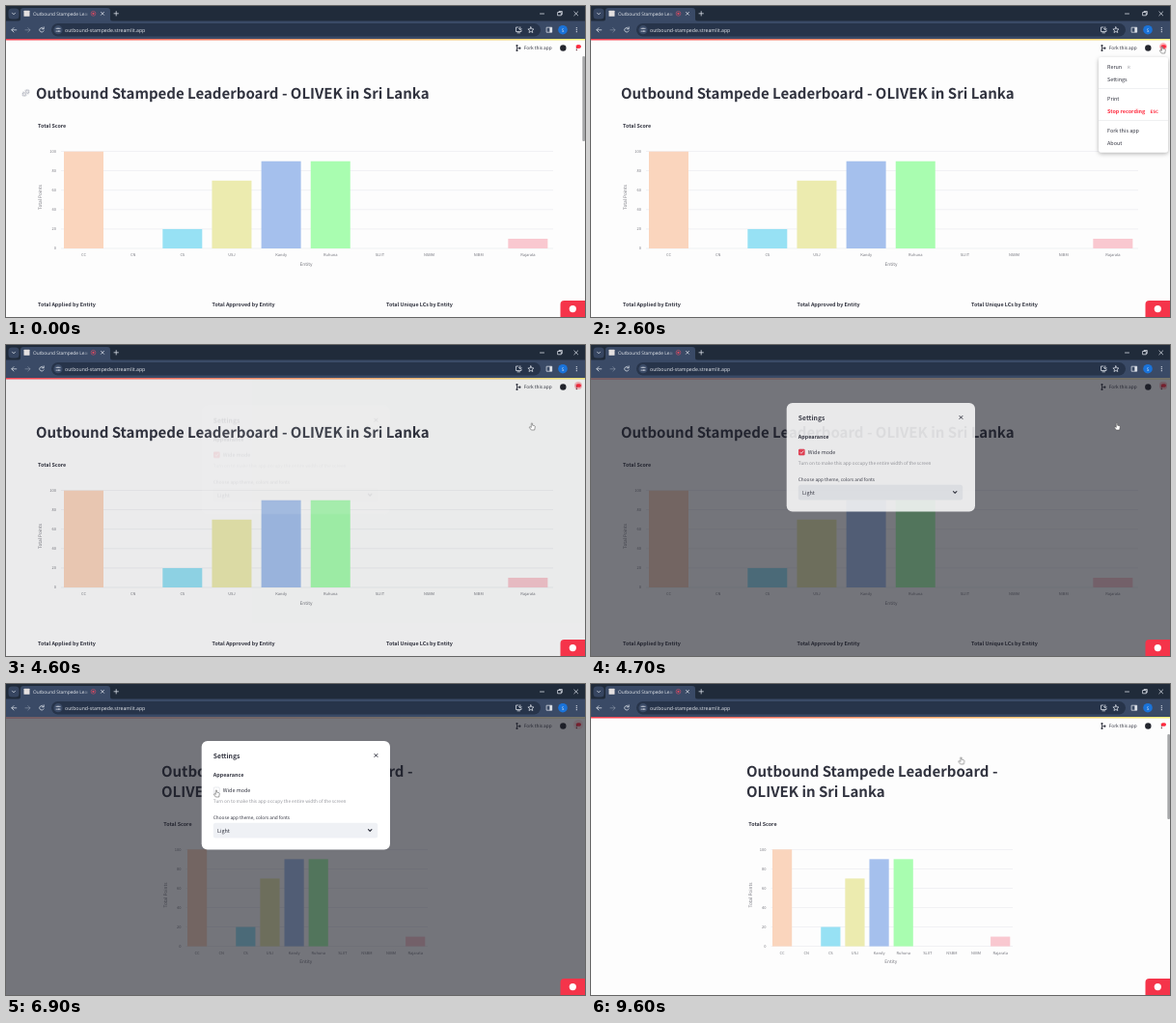
An HTML page that plays this animation: 600x322 px, repeating every 9700 ms.

```html
<!DOCTYPE html>
<html lang="en">
<head>
<meta charset="utf-8">
<title>Leaderboard</title>
<style>
html, body { margin: 0; width: 100%; height: 100%; overflow: hidden; background: #fff; }
svg { display: block; width: 600px; height: 322px; }
text {
  font-family: "Noto Sans CJK JP", "Noto Sans CJK SC", "Open Sans", sans-serif;
  fill: #31333f; white-space: pre; text-rendering: geometricPrecision;
}
.ui { font-family: "Open Sans", "Noto Sans", sans-serif; fill: #e6e9ee; }
.bold { font-weight: 700; }
.icon { fill: none; stroke: #d6dbe4; stroke-width: .8; stroke-linecap: round; stroke-linejoin: round; }
.loop { animation: 9.7s linear infinite; }

.anchor { animation-name: anchor; }
.bar { animation-name: bar; }
.menu { animation-name: menu; }
.hover { animation-name: hover; }
.pulse { animation-name: pulse; animation-duration: 1.94s; transform-origin: 593px 42px; }
.shade { animation-name: shade; }
.dialog { animation-name: dialog; }
.wide { animation-name: wide; }
.narrow { animation-name: narrow; }
.cursor { animation-name: move; }
.arrow { animation-name: arrow; }
.hand { animation-name: hand; }

@keyframes anchor { 0%, 9.27% { opacity: 1 } 9.28%, 100% { opacity: 0 } }
@keyframes bar { 0%, 22.67% { opacity: 1 } 22.68%, 91.74% { opacity: 0 } 91.75%, 100% { opacity: 1 } }
@keyframes menu { 0%, 22.67% { opacity: 0 } 22.68%, 47.41% { opacity: 1 } 47.42%, 100% { opacity: 0 } }
@keyframes hover { 0%, 44.32% { opacity: 0 } 44.33%, 100% { opacity: 1 } }
@keyframes pulse { 0% { opacity: .7; transform: scale(.4) } 70%, 100% { opacity: 0; transform: scale(1.2) } }
@keyframes shade { 0%, 47.3% { opacity: 0 } 48.3%, 89.69% { opacity: 1 } 91.75%, 100% { opacity: 0 } }
@keyframes dialog {
  0%, 47.3% { opacity: 0; transform: translateY(4px) }
  48.45% { opacity: .84; transform: translateY(1px) }
  49.5%, 89.69% { opacity: 1; transform: none }
  91.75%, 100% { opacity: 0; transform: translateY(4px) }
}
@keyframes wide { 0%, 67% { opacity: 1 } 67.01%, 100% { opacity: 0 } }
@keyframes narrow { 0%, 67% { opacity: 0 } 67.01%, 100% { opacity: 1 } }
@keyframes move {
  0%, 7.2% { transform: translate(500px, 80px); animation-timing-function: ease-in-out }
  19.6%, 30% { transform: translate(592px, 41px); animation-timing-function: ease-in-out }
  43%, 50.5% { transform: translate(545px, 80px); animation-timing-function: ease-in-out }
  58%, 60% { transform: translate(224.500px, 106px); animation-timing-function: ease-in-out }
  63%, 72% { transform: translate(218px, 109px); animation-timing-function: ease-in-out }
  84.5%, 100% { transform: translate(383.500px, 75px) }
}
@keyframes arrow {
  0%, 7.2% { opacity: 0 } 7.21%, 19.5% { opacity: 1 } 19.51%, 51.5% { opacity: 0 }
  51.51%, 61.5% { opacity: 1 } 61.51%, 73% { opacity: 0 } 73.01%, 83.5% { opacity: 1 } 83.51%, 100% { opacity: 0 }
}
@keyframes hand {
  0%, 19.5% { opacity: 0 } 19.51%, 51.5% { opacity: 1 } 51.51%, 61.5% { opacity: 0 }
  61.51%, 73% { opacity: 1 } 73.01%, 83.5% { opacity: 0 } 83.51%, 100% { opacity: 1 }
}
</style>
</head>
<body>
<svg id="stage" viewBox="0 0 600 322"></svg>
<script>
const GREY = '#808495', RED = '#ff2b3f', INK = '#31333f';
const FRAME = '#202b3a', TOOLBAR = '#3a4a66', FIELD = '#27344a';
const event = 'Outbound Stampede', club = 'OLIVEK in Sri Lanka';

const text = (x, y, size, str, attrs = '') => `<text x="${x}" y="${y}" font-size="${size}" ${attrs}>${str}</text>`;
const bold = (x, y, size, str, attrs = '') => text(x, y, size, str, 'class="bold" ' + attrs);
const rect = (x, y, w, h, fill, r = 0) => `<rect x="${x}" y="${y}" width="${w}" height="${h}" fill="${fill}" rx="${r}"/>`;
const icon = (d, attrs = '') => `<path class="icon" d="${d}" ${attrs}/>`;
const dot = (x, y, r, fill) => `<circle cx="${x}" cy="${y}" r="${r}" fill="${fill}"/>`;
const dots = (x, y, gap, r, fill) => [-gap, 0, gap].map(d => dot(x, y + d, r, fill)).join('');
const loop = (name, body) => `<g class="loop ${name}">${body}</g>`;

const scores = [
  ['CC', 100, '#fad5bd'], ['CN', 0], ['CS', 20, '#97e1f4'], ['USJ', 70, '#ecebaf'],
  ['Kandy', 90, '#a5c0ed'], ['Ruhuna', 90, '#a9fdb0'], ['SLIIT', 0], ['NSBM', 0],
  ['NIBM', 0], ['Rajarata', 10, '#f9c8d0']
];

function chart({ left, right, first, step, width, base, titleX }) {
  const mid = 'text-anchor="middle" fill-opacity=".65"';
  let out = '';
  for (let v = 0; v <= 100; v += 20) {
    const y = base - v * 1.003;
    out += rect(left, y - .25, right - left, .5, '#e4e5ea');
    out += text(left - 5, y + 1.4, 4, v, 'text-anchor="end" fill-opacity=".65"');
  }
  scores.forEach(([name, value, color], i) => {
    const x = first + i * step, h = value * 1.003;
    if (value) out += rect(x, base - h, width, h, color);
    out += text(x + width / 2, base + 8.2, 4, name, mid);
  });
  const midY = base - 53;
  out += text((left + right) / 2 - 1, base + 17.5, 4.75, 'Entity', mid);
  out += text(titleX, midY, 4.75, 'Total Points', `${mid} transform="rotate(-90 ${titleX} ${midY})"`);
  return out;
}

const windowBar = () => rect(0, 0, 600, 16, FRAME) + rect(0, 15.5, 600, 18.5, TOOLBAR)
  + `<path d="M12 16q3 0 3-3V5q0-3 3-3h87q3 0 3 3v8q0 3 3 3z" fill="${TOOLBAR}"/>`
  + rect(2.5, 2.5, 11, 11, '#364560', 3.5) + icon('M6.500 7.200l1.500 1.600 1.500-1.600')
  + rect(18.5, 4.8, 6, 6, '#e4e0e0', .5)
  + `<svg x="28" y="0" width="57" height="16"><text class="ui" x="0" y="9.800" font-size="4.800">${event} Leaderboard</text></svg>`
  + rect(80, 3, 6, 10, 'url(#tabFade)')
  + '<circle cx="90.500" cy="7.800" r="2.400" fill="none" stroke="#d0506a" stroke-width=".6"/>' + dot(90.5, 7.8, 1.1, '#e8485e')
  + icon('M98.500 6.300l3 3m0-3l-3 3M112 7.800h4.400m-2.200-2.200v4.400')
  + icon('M553.500 8h4M572 6.500h3.300v3.300H572zM573 6.500v-1h3.300v3.300h-1M588.800 6l3.800 3.800m0-3.800l-3.800 3.800', 'stroke-width=".6"')
  + icon('M10.800 24.800H6m2-2.200l-2.200 2.200L8 27')
  + icon('M20 24.800h4.800m-2-2.200l2.200 2.200-2.200 2.200', 'opacity=".4"')
  + icon('M39 23.500a2.300 2.300 0 1 0 .1 2.300M39.200 21.800v2h-2')
  + rect(47, 18, 507, 13.4, FIELD, 6.7) + dot(54, 24.7, 4.6, TOOLBAR)
  + icon('M52 23.300h1m2 0h1.200M52 26.100h1.800m1.800 0h.6') + dot(54, 23.3, .8, '#d6dbe4') + dot(54.8, 26.1, .8, '#d6dbe4')
  + text(61, 26.6, 5.2, event.toLowerCase().replace(' ', '-') + '.streamlit.app', 'class="ui"')
  + icon('M531 22h-2.500v4.500h5.500v-1.500M530 27.800h2.500M532.800 21.800v2.800m-1.300-1.200l1.300 1.300 1.300-1.300')
  + icon('M543.900 21.800l.9 2 2.100.2-1.600 1.400.5 2.100-1.900-1.100-1.900 1.100.5-2.100-1.600-1.400 2.100-.2z', 'stroke-width=".6"')
  + icon('M560.500 22.200h5.200v5h-5.200z') + rect(563.4, 22.2, 2.3, 5, '#e4e8ee')
  + dot(577, 24.7, 4.8, '#1a73d9') + text(577, 26.5, 4.8, 'S', 'class="ui" text-anchor="middle"')
  + dots(591.3, 24.7, 2, .65, '#d6dbe4');

const wide = () => bold(31, 96, 15, `${event} Leaderboard - ${club}`)
  + bold(33, 126, 5.4, 'Total Score')
  + chart({ left: 57, right: 567, first: 60, step: 51.15, width: 41, base: 251, titleX: 37 })
  + bold(33, 311, 5.4, 'Total Applied by Entity') + bold(213.5, 311, 5.4, 'Total Approved by Entity')
  + bold(394, 311, 5.4, 'Total Unique LCs by Entity');

const narrow = () => bold(161, 96, 15, `${event} Leaderboard -`) + bold(161, 116.5, 15, club)
  + bold(163.3, 146.7, 5.4, 'Total Score')
  + chart({ left: 186.5, right: 437, first: 188, step: 25.12, width: 20.2, base: 271.6, titleX: 167 });

const toolbar = () => icon('M529.500 41v5m0-2.300h2.600', `style="stroke:${INK}"`)
  + dot(529.5, 41, 1.1, INK) + dot(529.5, 46, 1.1, INK) + dot(532.4, 43.7, 1.1, INK)
  + text(536.8, 45.4, 4.75, 'Fork this app') + dot(577.3, 43.5, 3.2, '#24262e')
  + loop('pulse', dot(593, 42, 5, RED))
  + dots(591.3, 43.6, 1.9, .65, '#5d2730') + rect(590.8, 40.2, 5.2, 3.6, RED, 1.7);

const menu = () => '<rect x="526" y="53" width="72" height="98.500" rx="3" fill="#fff" filter="url(#shadow)"/>'
  + text(535, 65.3, 5.45, 'Rerun') + text(556, 65.2, 4.3, 'R', 'fill-opacity=".5"')
  + text(535, 78.4, 5.45, 'Settings')
  + loop('hover', rect(526, 70, 72, 13, '#f4f5f8') + text(535, 78.4, 5.45, 'Settings', 'fill-opacity=".14"'))
  + rect(526, 85.3, 72, .5, '#dfe0e5') + text(535, 98.1, 5.45, 'Print')
  + bold(535, 111.1, 5.45, 'Stop recording', `style="fill:${RED}"`) + bold(579.5, 110.9, 4.5, 'ESC', `style="fill:${RED}"`)
  + rect(526, 118, 72, .5, '#dfe0e5') + text(535, 130.7, 5.45, 'Fork this app') + text(535, 143.8, 5.45, 'About');

const dialog = () => rect(202.7, 59, 195.3, 112.6, '#fff', 6)
  + bold(214.8, 76.8, 6.8, 'Settings') + icon('M381.900 72.400l3.100 3.100m0-3.100l-3.100 3.100', `style="stroke:${INK};stroke-width:1"`)
  + bold(214.8, 96, 5.45, 'Appearance')
  + '<rect x="215.300" y="107" width="6" height="6" rx="1" fill="#fff" stroke="#d3d5dc" stroke-width=".5"/>'
  + loop('wide', rect(215, 106.7, 6.6, 6.6, '#f5364c', 1.2) + icon('M216.700 110.100l1.200 1.200 2.100-2.500', 'style="stroke:#fff"'))
  + text(224.8, 112, 5.45, 'Wide mode')
  + text(214.8, 123.2, 4.76, 'Turn on to make this app occupy the entire width of the screen', 'fill-opacity=".5"')
  + text(214.8, 139.6, 4.76, 'Choose app theme, colors and fonts')
  + rect(214.8, 143.8, 170.4, 15.6, '#eff1f5', 2.5) + text(219, 153.6, 5.45, 'Light')
  + icon('M375.500 150.700l1.700 1.700 1.700-1.700', `style="stroke:${INK};stroke-width:1.200"`);

const cursor = () => loop('arrow', '<path d="M0 0v6.200l1.500-1.300 1 2.200.9-.4-1-2.200h2z" fill="#fff" stroke="#333" stroke-width=".4"/>')
  + loop('hand', '<path d="M-.7 1.200q.7-1.100 1.300 0v2l2.100.5q.7.300.6 1L2.700 8h-3.400L-2.600 5.500q-.2-.9.700-.8l1.200.7z" fill="#fff" stroke="#444" stroke-width=".5"/>');

document.getElementById('stage').innerHTML = `
  <defs>
    <linearGradient id="strip"><stop stop-color="#ff4052"/><stop offset="1" stop-color="#fbf07a"/></linearGradient>
    <linearGradient id="tabFade"><stop stop-color="${TOOLBAR}" stop-opacity="0"/><stop offset="1" stop-color="${TOOLBAR}"/></linearGradient>
    <filter id="shadow" x="-20%" y="-20%" width="140%" height="140%">
      <feDropShadow dx="0" dy="1.500" stdDeviation="2" flood-opacity=".3"/>
    </filter>
  </defs>`
  + rect(0, 33, 600, 289, '#fdfdfd') + rect(0, 33.7, 600, 1.8, 'url(#strip)')
  + loop('anchor', `<g transform="rotate(-40 20.500 90)" fill="none" stroke="${GREY}" stroke-width=".7">
      <path d="M20 88.200h-1.500a1.800 1.800 0 0 0 0 3.600H20M21 88.200h1.500a1.800 1.800 0 0 1 0 3.600H21M18.800 90h3.400"/></g>`)
  + loop('wide', wide()) + loop('narrow', narrow())
  + loop('bar', rect(597.3, 52, 2.7, 88, '#a6a7a9', 1))
  + toolbar() + loop('menu', menu())
  + loop('shade', rect(0, 33.5, 600, 288.5, 'rgba(26,28,38,.6)') + rect(0, 33.5, 600, 2, 'rgba(116,116,120,.7)'))
  + loop('dialog', dialog())
  + '<path d="M574.500 322V309q0-4 4-4H600v17z" fill="#f5344a"/>' + dot(587.3, 313.6, 3.6, '#fff')
  + windowBar() + loop('cursor', cursor());
</script>
</body>
</html>
```
